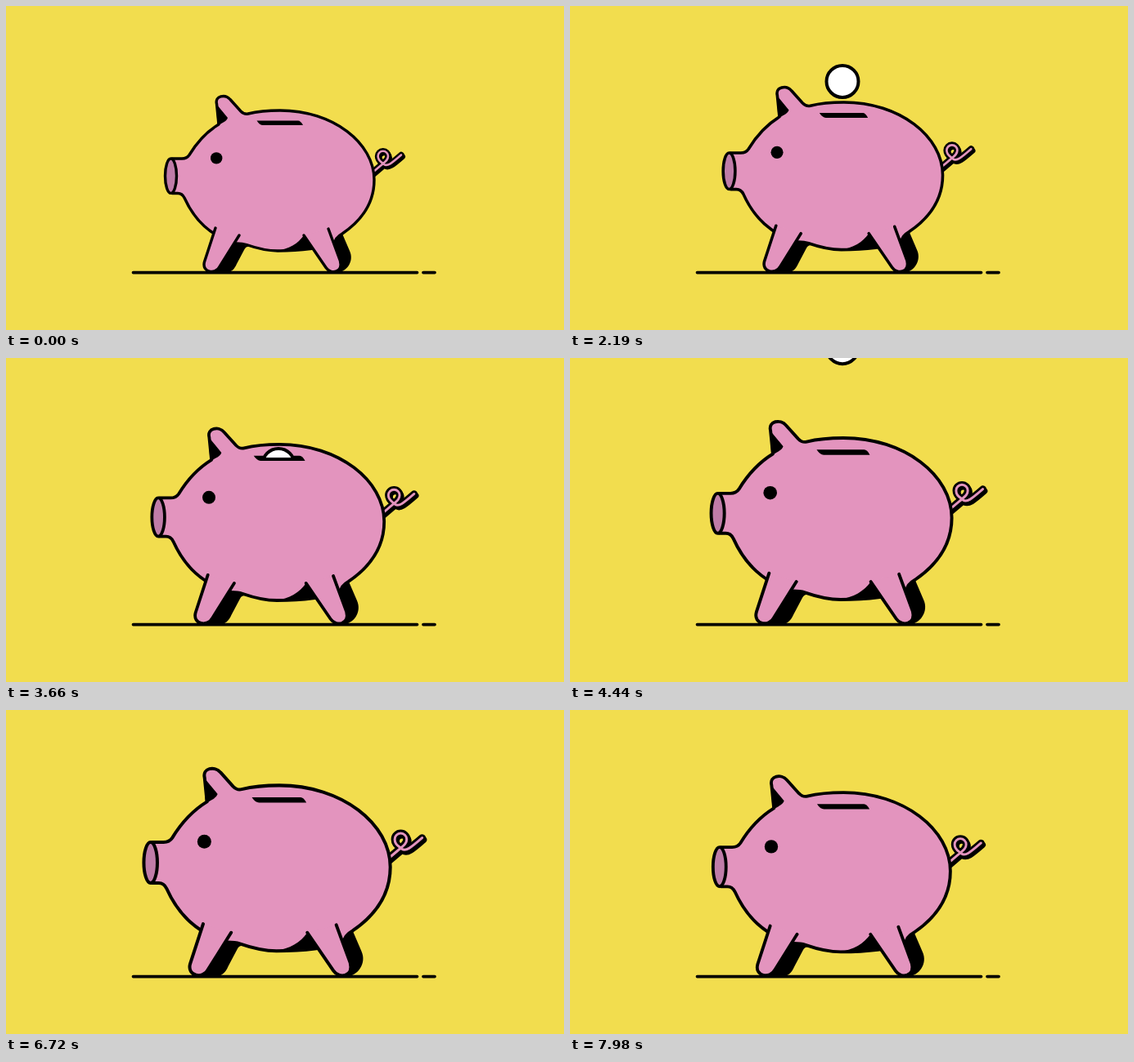
An HTML page for the animation above (8000 ms loop, 682 by 397 pixels).

```html
<!DOCTYPE html>
<html lang="en">
<head>
<meta charset="utf-8">
<title>Piggy bank</title>
<style>
  html, body { margin: 0; width: 100%; height: 100%; overflow: hidden; background: #f2dd4e; }
  svg { display: block; width: 100%; height: 100%; }
  .line { fill: none; stroke: #000; stroke-width: 3.4; stroke-linecap: round; stroke-linejoin: round; }
  .skin { fill: #e394be; }
</style>
</head>
<body>
<svg viewBox="0 0 682 397">
  <defs>
    <clipPath id="aboveSlot"><rect id="clipRect" width="682" height="142"/></clipPath>
    <path id="tail" d="M448 204L458 195.500C463 191 467 189 467 184A6.200 6.200 0 1 0 454.600 184C454.600 190 459 191 462 194C466 197 471 193 483 182.500"/>
  </defs>
  <g id="pig">
    <use href="#tail" class="line" x="1.5" y="2" style="stroke-width:7"/>
    <use href="#tail" class="line" style="stroke-width:7.6"/>
    <use href="#tail" class="line" style="stroke:#e394be;stroke-width:2.6"/>
    <path d="M274 289L300 295Q293.500 293.500 291.500 298L282 316C279 323 275 326.500 268 326.500H252Z"/>
    <path d="M396 287L411 279L420 300C426 313 416 326.500 404 326.500H395Z"/>
    <path class="line skin" d="M203 187H215C220 187 222 185.500 224 182.500C234 166 247 153 260 145L257.500 120C255 110 268 107.500 274 114.500L287 129C290 132 292 133 296 132C308 129 321 128 335 128C400 128 450 168 450 213C450 243 433 264 411 279C404 283 402 287 402 291C385 297 360 300 332 300C318 300 304 296 294 292.500Q288 290.500 278 291C250 280 231 264 218 235C216 231 214 229.500 210 229.500H203Z"/>
    <path d="M257 120L271 137Q270 140.500 264 143.500L258.500 147Z"/>
    <path d="M364 281C357 291 346 298 330 300C345 302 360 299 372 298L378 300V296Z"/>
    <path class="line skin" d="M256 272L242.500 313.500C239 326.500 256 329.500 261 319.500L285 281"/>
    <path class="line skin" d="M394 273L408.500 312.500C412 326.500 397 329.500 391 320.500L364 281"/>
    <ellipse class="line" cx="201.500" cy="208.200" rx="7" ry="21.200" style="fill:#c07ca8"/>
    <circle cx="257.200" cy="186.400" r="7.200"/>
    <path d="M306.500 140.500H357Q360 140.500 363 146H314Q310 146 306.500 140.500Z"/>
    <path id="puff" class="line" style="stroke-width:3"/>
  </g>
  <path class="line" style="stroke-width:3.7" d="M155.500 326.600H502.500M510 326.600H524"/>
  <g clip-path="url(#aboveSlot)">
    <circle id="coin" cx="333" r="19.500" fill="#fff" stroke="#000" stroke-width="4"/>
  </g>
</svg>
<script>
  const LOOP = 8000, STEP = 0.0503, RAMP = 245, PUFF = 345;
  const CENTER = 340, GROUND = 327, SLOT = 142.5, COIN_R = 21.5, FALL = 0.262;
  const grows = [1290, 2440, 3610, 4870];
  const shrinks = [6613, 7905];
  const puffs = [1605, 2815, 3985, 5160, 6375, 7630];
  const drops = [431, 1756, 3081, 4406];
  const rise = { start: 6850, end: 7560 };
  // Each ray runs outward from the snout.
  const rays = [
    [185.7, 192.7, 174.9, 184.5],
    [183.9, 201.3, 171.2, 196.3],
    [183.9, 209, 168.5, 209],
    [183.9, 216.3, 170.3, 220.8],
    [185.7, 223.5, 174.9, 231.7]
  ];

  const el = id => document.getElementById(id);
  const pig = el('pig'), puff = el('puff'), coin = el('coin'), clipRect = el('clipRect');
  const clamp = v => Math.min(1, Math.max(0, v));
  const mix = (a, b, k) => a + (b - a) * k;
  const ramps = (starts, t) => starts.reduce((sum, s) => sum + clamp((t - s) / RAMP), 0);

  function puffPath(t) {
    const start = puffs.find(s => t > s && t < s + PUFF);
    if (start === undefined) return '';
    const p = (t - start) / PUFF;
    const head = clamp(p / 0.45), tail = clamp((p - 0.55) / 0.45);
    return rays.map(([x1, y1, x2, y2]) =>
      `M${mix(x1, x2, tail)} ${mix(y1, y2, tail)}L${mix(x1, x2, head)} ${mix(y1, y2, head)}`).join('');
  }

  function coinY(t, slotY) {
    if (t >= rise.start && t < rise.end) {
      return mix(slotY + COIN_R, -COIN_R, (t - rise.start) / (rise.end - rise.start));
    }
    const start = drops.find(s => t >= s && t < s + 800);
    return start === undefined ? -100 : (t - start) * FALL - COIN_R;
  }

  function draw(now) {
    const t = now % LOOP;
    const scale = 1 + STEP * (ramps(grows, t) - ramps(shrinks, t));
    const slotY = GROUND - (GROUND - SLOT) * scale;
    pig.setAttribute('transform',
      `translate(${CENTER} ${GROUND}) scale(${scale}) translate(${-CENTER} ${-GROUND})`);
    puff.setAttribute('d', puffPath(t));
    clipRect.setAttribute('height', slotY);
    coin.setAttribute('cy', coinY(t, slotY));
  }

  const begin = performance.now();
  function tick() {
    draw(performance.now() - begin);
    requestAnimationFrame(tick);
  }
  tick();
</script>
</body>
</html>
```
